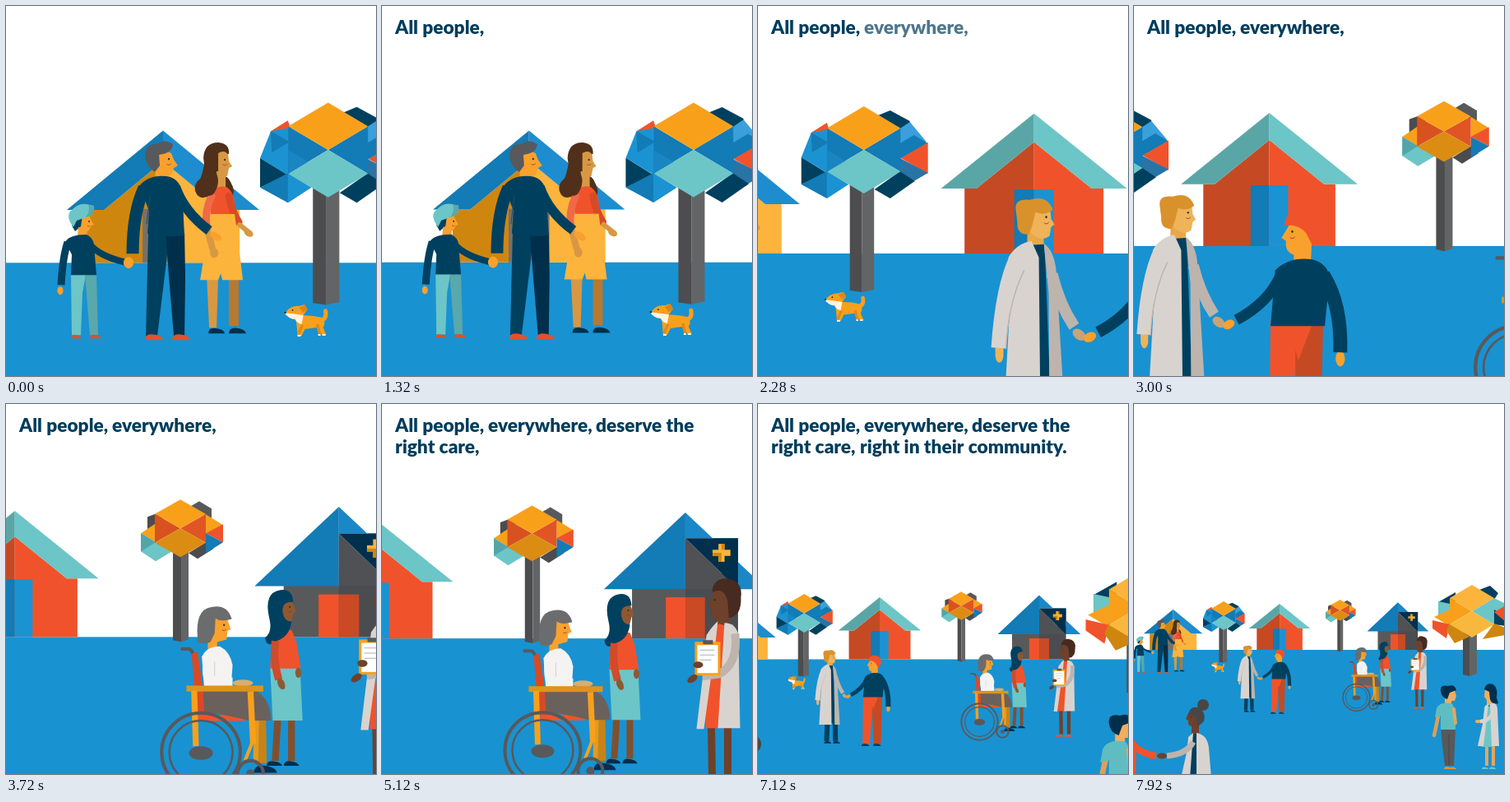
Recreate the animation shown at these times as an HTML page with a canvas. Size 450 by 450 pixels, loop 8 s.

```html
<!DOCTYPE html>
<html lang="en">
<head>
<meta charset="utf-8">
<title>Community care</title>
<style>
html, body { margin: 0; width: 100%; height: 100%; overflow: hidden; background: #fff; }
canvas { display: block; width: 100vw; height: 100vh; }
</style>
</head>
<body>
<canvas id="stage"></canvas>
<script>
const SIZE = 450, LOOP = 8000;
const canvas = document.getElementById('stage');
const ctx = canvas.getContext('2d');
const dpr = window.devicePixelRatio || 1;
canvas.width = canvas.height = SIZE * dpr;

const NAVY = '#00405f', DEEP = '#002f4c', TEAL = '#6cc5c7', RED = '#f0532b', RUST = '#c54a24',
  GOLD = '#f9a01b', SUN = '#fdb43c', OCHRE = '#cf860f', BLUE = '#137bb5', SKY = '#1b93d2',
  GREY = '#58595b', COAT = '#d9d3cf', SHADE = '#bdb4ad', SKIN = '#f9a12e', BROWN = '#6d412b',
  HAIR = '#50301a', TAN = '#d89843';

// Camera stops: centre x, horizon offset, zoom.
const CAMERA = [[58, 26.7, 3.27], [140.6, 25, 3.04], [268, 20.9, 2.705], [248, 47.6, 1.868], [225, 74, 1]];
const mix = (a, b, u) => a + (b - a) * u;
const clamp = v => Math.max(0, Math.min(1, v));

// Position along the camera stops at time t.
function progress(t) {
  const span = (a, b) => clamp((t - a) / (b - a));
  const u = span(6240, 7920);
  return span(1275, 2280) + span(2280, 3880) + span(5040, 6240) + u * (1.3 - 0.3 * u);
}
function pick(stops, p) {
  const i = Math.min(stops.length - 2, Math.floor(p));
  return stops[i].map((v, n) => mix(v, stops[i + 1][n], p - i));
}

const paths = new Map();
function fill(color, d) {
  if (!paths.has(d)) paths.set(d, new Path2D(d));
  ctx.fillStyle = color;
  ctx.fill(paths.get(d));
}
function line(color, width, d, cap = 'round') {
  if (!paths.has(d)) paths.set(d, new Path2D(d));
  ctx.strokeStyle = color;
  ctx.lineWidth = width;
  ctx.lineCap = cap;
  ctx.lineJoin = 'round';
  ctx.stroke(paths.get(d));
}
function oval(color, x, y, rx, ry = rx, turn = 0) {
  ctx.fillStyle = color;
  ctx.beginPath();
  ctx.ellipse(x, y, rx, ry, turn, 0, Math.PI * 2);
  ctx.fill();
}
function ring(color, width, x, y, r) {
  ctx.strokeStyle = color;
  ctx.lineWidth = width;
  ctx.beginPath();
  ctx.arc(x, y, r, 0, Math.PI * 2);
  ctx.stroke();
}
function box(color, x, y, w, h) {
  ctx.fillStyle = color;
  ctx.fillRect(x, y, w, h);
}
function shoe(color, x, y, w) {
  fill(color, `M${x} ${y}q0 -${w * .32} ${w * .35} -${w * .32}q${w * .6} ${w * .05} ${w * .65} ${w * .32}z`);
}
function face(x, y, k) {
  oval('#3b2519', x, y, k, k * 1.2);
  line('#8a3b1a', k * .7, `M${x - k * 2} ${y + k * 6}q${k * 2.5} ${k * 2} ${k * 4.5} ${-k * .6}`);
}

let cam;
function place([x, y, k], ox, oy, draw) {
  const [cx, h, s] = cam;
  ctx.save();
  ctx.translate(225 + s * (x - cx), 225 + s * (y + h));
  ctx.scale(s * k, s * k);
  ctx.translate(-ox, -oy);
  draw();
  ctx.restore();
}

// Houses are drawn in world units around the middle of the base line.
function house(top, eave, half, wall, roof, front, door, doorHalf, doorTop) {
  const inner = top + 11.4, foot = half * (eave - inner) / (eave - top);
  fill(front[0], `M0 ${inner}L${-foot} ${eave}H${-wall}V0H0z`);
  fill(front[1], `M0 ${inner}L${foot} ${eave}H${wall}V0H0z`);
  box(door[0], -doorHalf, doorTop, doorHalf, -doorTop);
  box(door[1], 0, doorTop, doorHalf, -doorTop);
  fill(roof[0], `M0 ${top}L${-half} ${eave}H${-foot}L0 ${inner}z`);
  fill(roof[1], `M0 ${top}L${half} ${eave}H${foot}L0 ${inner}z`);
}
function clinic() {
  box(GREY, -24.5, -23, 24.6, 23);
  box('#4b4c4f', 0, -30, 24.2, 30);
  fill(BLUE, 'M0 -57.8L-37.4 -22.6H0z');
  fill('#1b87c6', 'M0 -57.8L37.4 -22.6H24.2V-46H0z');
  fill('#505154', 'M0 -46L24.2 -22.6H0z');
  fill('#00304d', 'M0 -46H24.2V-22.6z');
  box(RED, -9, -18.9, 9, 18.9);
  box('#c94a25', 0, -18.9, 9, 18.9);
  box(SUN, 15.2, -43.4, 2.8, 8.2);
  box(SUN, 12.5, -40.7, 8.2, 2.8);
  fill(OCHRE, 'M16.6 -43.4H18V-40.7H16.6zM12.5 -39.3H16.6V-35.2H15.2V-37.9H12.5z');
}

// Front block of a tree: diamonds above and below, a triangle on each side.
function block(x, y, w, h, top, left, right, base) {
  fill(left, `M${x - w} ${y - h}L${x} ${y}L${x - w} ${y + h}z`);
  fill(right, `M${x + w} ${y - h}L${x} ${y}L${x + w} ${y + h}z`);
  fill(top, `M${x} ${y - 2 * h}l${w} ${h}l${-w} ${h}l${-w} ${-h}z`);
  fill(base, `M${x} ${y}l${w} ${h}l${-w} ${h}l${-w} ${-h}z`);
}
function trunk(l, m, r, top, bottom) {
  fill('#4d4d4f', `M${l} ${top}H${m}V${bottom}L${l} ${bottom - 2}z`);
  fill('#636466', `M${m} ${top}H${r}V${bottom - 3}L${m} ${bottom}z`);
}
function blueTree() {
  trunk(112, 126.5, 141.5, 215, 348);
  fill(NAVY, 'M144 134L161 127L185 140V157L174 150z');
  fill('#3a9fdb', 'M173 149L185 141L205 165L173 180z');
  fill(RED, 'M65 154L84 142L88 153L84 156z');
  fill(SKY, 'M65 154L86 150V204L53 184z');
  fill(BLUE, 'M65 154L86 166L66 178z');
  fill(NAVY, 'M53 184L84 203L53 217z');
  fill(BLUE, 'M53 217L84 201L110 217L84 234z');
  fill(SKY, 'M84 201L110 217L84 234z');
  fill(BLUE, 'M173 167L190 157L207 167L173 186z');
  fill(RED, 'M207 166V204L174 185z');
  fill('#2a73a5', 'M173 185L207 203L190 213L173 204z');
  fill(NAVY, 'M173 201L191 213L161 234L142 223z');
  block(129, 175, 44.5, 26.5, GOLD, BLUE, BLUE, TEAL);
  fill('#1985c3', 'M84.5 201.5L106.7 188.3L84.5 175z');
}
function goldTree() {
  trunk(202, 212, 221, 176, 289);
  fill('#4b4c4f', 'M171 137L190 130V148L171 158z');
  fill(GREY, 'M222 125L234 118L249 127V140L240 135z');
  fill('#4b4c4f', 'M221 181L242 168L251 176L232 188z');
  fill(GOLD, 'M163 157L181 145V168z');
  fill(TEAL, 'M163 157L201 179L181 191L163 179z');
  fill('#53a5aa', 'M163 157L181 168L163 179z');
  fill(GOLD, 'M242 134L263 147L242 158z');
  fill(RED, 'M263 146V168L242 157z');
  fill(BLUE, 'M242 157L263 168L242 181z');
  block(211, 151, 31, 17.5, GOLD, '#d7521f', '#e15524', '#db8d13');
}
function brightTree() {
  trunk(400, 408, 417, 275, 331);
  fill(NAVY, 'M370 241L391 229V246L370 256z');
  fill(NAVY, 'M420 226L433 221L443 230L438 238z');
  fill(TEAL, 'M370 240L398 246L384 268L370 258zM438 236L450 242V262L432 250z');
  fill(GOLD, 'M365 259L384 250V270z');
  fill(RED, 'M363 263L384 268L380 285L363 273z');
  fill(OCHRE, 'M380 276L384 266L408 283L390 291z');
  fill(NAVY, 'M438 250L452 259V270L438 268z');
  fill(RED, 'M438 253L452 245V265z');
  fill(OCHRE, 'M438 267L451 272V281L424 286z');
  block(411, 252, 27, 16, SUN, GOLD, TEAL, '#f8b83e');
}

function family() {
  // boy
  line(NAVY, 9, 'M75 288Q69 306 67 340', 'butt');
  oval(SKIN, 66, 347, 3.5, 5);
  oval(SKIN, 95, 265, 9, 11);
  fill(NAVY, 'M82 258L93 256L91 269L84 275L80 268z');
  fill(SKIN, 'M88 270H98L99 282H87z');
  face(101, 263, .9);
  fill(SKIN, 'M103 261L107 267L102 269z');
  fill(TEAL, 'M82 270Q72 257 79 250Q88 240 98 242L107 244Q108 252 103 256L86 262z');
  fill('#59a8ac', 'M100 243L107 244Q108 252 103 256L97 258Q103 250 100 243z');
  fill(NAVY, 'M72 288Q77 279 98 279Q106 283 107 291L110 329H79L80 303z');
  line(NAVY, 8, 'M102 291Q114 305 143 312');
  oval(SKIN, 149, 313, 6, 5);
  fill(TEAL, 'M79 328H97L93 350L91 401H80z');
  fill('#59a8ac', 'M96 328H110L112 401H102z');
  shoe('#d8532b', 79, 405, 13);
  shoe('#d8532b', 102, 405, 14);
  // woman
  fill(HAIR, 'M240 186Q241 167 258 167Q272 168 271 181L262 182Q256 190 261 208Q269 206 273 215Q280 227 274 234Q266 241 261 233Q254 241 244 233Q234 237 230 226Q228 217 236 211Q243 200 240 186z');
  line('#b67932', 12, 'M277 330L277 390', 'butt');
  fill(TAN, 'M244 330H258L256 392H247z');
  shoe(DEEP, 246, 399, 20);
  shoe(DEEP, 271, 399, 21);
  fill(TAN, 'M256 202H267V226H256zM258 180Q266 175 270 182L271 190L275 196L271 198L269 208L258 207z');
  face(266, 188, 1);
  fill(RED, 'M247 228Q257 218 268 221Q276 226 278 239L277 256H249z');
  line('#d84a26', 9, 'M271 232Q274 250 283 264');
  line(TAN, 6, 'M284 267L294 275');
  oval(TAN, 295, 277, 6, 4, .5);
  fill(SUN, 'M249 254H278L288 334H263L261 326L258 334H236L244 285z');
  line('#ee6a48', 9, 'M250 232Q241 250 244 270');
  line(TAN, 8, 'M245 274L251 296');
  oval(TAN, 253, 301, 5, 6);
  fill(HAIR, 'M243 186Q259 182 257 176Q259 192 255 203Q262 216 252 230Q242 236 234 223z');
  // man
  oval(SKIN, 149, 313, 6, 7);
  fill(SKIN, 'M181 188Q190 174 201 180L204 188L209 195L204 198L201 207L194 208L193 218H182z');
  fill(GREY, 'M169 181Q171 168 184 169Q192 162 203 169Q202 180 186 182L187 195L181 203Q169 195 169 181z');
  face(198, 187, 1.1);
  fill(NAVY, 'M173 277H199L194 320L184 402H170z');
  fill(DEEP, 'M194 277H217L218 330L217 402H204L198 330z');
  fill(NAVY, 'M162 220Q173 206 195 208Q211 210 214 228L217 280Q196 283 172 278L174 250z');
  line(NAVY, 15, 'M168 222Q154 252 154 302', 'butt');
  line(NAVY, 12, 'M206 221Q217 252 247 274', 'butt');
  line('#174e6e', 1, 'M175 232L171 266');
  oval(SKIN, 255, 281, 8, 4.5, .55);
  shoe('#e0532b', 169, 407, 22);
  shoe('#e0532b', 202, 407, 22);
}

function dog() {
  line(GOLD, 5, 'M381 384Q390 382 388 372');
  fill(GOLD, 'M352 378Q368 376 384 380Q389 386 385 392L389 401H384L377 392L363 394L359 402H354z');
  line('#e18a17', 3.5, 'M360 389L355 400M378 388L381 400', 'butt');
  line('#fff3e2', 2, 'M354 402H358M384 401H388M379 401H382', 'butt');
  fill(GOLD, 'M340 373Q346 365 356 366L362 364L366 370L361 377Q355 383 346 381z');
  fill('#dd8518', 'M356 368L363 364L366 370L361 374z');
  fill('#fff3e2', 'M338 374L346 375Q354 376 361 377L359 388Q353 387 351 382Q342 381 338 374z');
  oval(DEEP, 339, 374, 1.2);
  oval(DEEP, 348, 371, .9);
}

function handshake() {
  // doctor
  line('#efb35a', 10, 'M294 408V420');
  oval('#efb35a', 294, 424, 5, 10);
  line(NAVY, 18, 'M329 490L326 564M357 490L358 564', 'butt');
  shoe(DEEP, 317, 573, 26);
  shoe(DEEP, 349, 573, 26);
  fill('#e8a849', 'M328 262H348V296H328z');
  fill('#efb35a', 'M326 252Q344 234 356 250L357 259L361 266L357 269L355 280Q345 288 332 276z');
  fill('#d9922b', 'M314 248Q312 234 331 236Q352 229 359 248Q350 256 338 251L334 267L330 278Q315 279 316 264z');
  face(351, 257, 1.2);
  fill(NAVY, 'M331 291L349 290L357 500H338z');
  fill(COAT, 'M305 306Q315 289 333 286L342 306L344 505H299L306 380z');
  fill(SHADE, 'M348 289Q360 297 363 321L374 505H355L354 350z');
  line(SHADE, 14, 'M358 326Q367 363 385 390', 'butt');
  line(COAT, 18, 'M315 307Q298 342 293 416', 'butt');
  line(SHADE, 1.5, 'M324 322Q305 360 302 417');
  oval('#c9a376', 391, 400, 9, 6, .65);
  // neighbour
  ctx.translate(398, 403);
  ctx.scale(2.02, 2.02);
  ctx.translate(-20, -373);
  fill(RED, 'M50 370H70L66 400L62 458H49z');
  fill(RUST, 'M66 370H84L82 458H69L66 400z');
  fill(RED, 'M60 370H78L68 396z');
  shoe(NAVY, 47, 462, 14);
  shoe(NAVY, 68, 462, 14);
  oval(SKIN, 95, 395, 3, 5);
  line(NAVY, 9, 'M84 341Q96 360 95 391', 'butt');
  fill(SKIN, 'M62 309Q70 303 77 310L76 333H65V328Q59 326 60 319L57 317z');
  fill(RED, 'M59 309Q60 298 72 299Q84 301 82 314L77 322L73 314Q68 308 59 309z');
  face(64, 313, .65);
  fill(NAVY, 'M53 338Q62 329 77 331Q88 334 88 344L85 374H50z');
  line(NAVY, 7, 'M57 340Q49 359 28 370', 'butt');
  oval(SKIN, 23, 373, 4, 2.8, -.5);
}

function clinicVisit() {
  // visitor
  line('#80502e', 8, 'M285 380L282 431M301 380L301 431', 'butt');
  shoe(DEEP, 272, 437, 18);
  shoe(DEEP, 292, 437, 18);
  fill(TEAL, 'M276 322H311L314 384H279z');
  fill('#8d5931', 'M286 244Q300 237 303 248L306 256L303 259L300 271H286z');
  fill(RED, 'M278 286Q288 275 301 278Q308 291 309 323H276z');
  line(RED, 7, 'M303 291L308 320');
  oval('#8d5931', 309, 328, 3.5, 6);
  fill(NAVY, 'M275 264Q268 234 288 231Q302 229 303 245Q288 244 291 259Q293 268 301 268Q299 286 283 291Q272 300 270 287Q279 280 275 264z');
  face(299, 251, .9);
  line('#cf4b2b', 9, 'M282 291Q279 312 286 336', 'butt');
  oval('#8d5931', 289, 341, 4, 7, -.4);
  // doctor
  line(BROWN, 9, 'M400 390L401 452M420 390L420 452', 'butt');
  shoe(RED, 387, 459, 18);
  shoe(RED, 410, 459, 18);
  fill('#472a20', 'M401 226Q404 211 419 212Q439 215 436 235Q437 258 421 260L410 246z');
  fill(BROWN, 'M403 228Q416 223 420 240L422 270H405V262Q398 260 400 250L396 246z');
  face(404, 238, 1);
  fill(RED, 'M394 284L409 267L420 270L413 394H393z');
  fill(COAT, 'M394 281Q401 270 408 264L404 300L391 395H382L391 320z');
  fill(COAT, 'M416 266Q430 266 433 281L435 394H408z');
  line(SHADE, 10, 'M429 279Q433 315 410 328L389 331', 'butt');
  box(GOLD, 380, 289, 31, 41);
  box('#fff', 383, 293, 25, 34);
  box(GREY, 390, 287, 12, 5);
  line('#a9b2b8', 1, 'M386 299H404M386 305H404M386 311H400', 'butt');
  oval(BROWN, 384, 317, 6, 4);
  oval(BROWN, 377, 334, 7, 4, -.6);
  // chair and seated woman
  line(GREY, 4, 'M173 300H181Q187 302 188 318');
  fill('#d84a26', 'M184 306L191 303L202 379H190z');
  line('#c88318', 14, 'M264 376L265 434', 'butt');
  line('#e09a25', 6, 'M260 384L259 434', 'butt');
  line(RED, 7, 'M192 381H246', 'butt');
  shoe(DEEP, 257, 445, 27);
  fill(SKIN, 'M207 264Q220 256 226 266L230 277L226 279L225 289L214 292V302H203V285z');
  fill('#6b6c6e', 'M191 287Q188 254 207 251Q226 247 231 265Q218 269 212 264L211 282L206 292Q198 296 191 292z');
  face(222, 272, 1);
  fill('#f5f3f2', 'M196 309Q202 297 217 297Q229 303 232 319L230 348H199z');
  fill('#6b615c', 'M197 344Q225 348 257 347Q277 358 277 384H251Q225 377 199 374z');
  line('#f5f3f2', 13, 'M204 312Q201 337 209 340L232 340', 'butt');
  line('#d2cfcd', 1, 'M211 315L211 331');
  oval('#d9ad70', 244, 340, 12, 4);
  box('#dc941c', 178, 343, 90, 7);
  line(GOLD, 7, 'M187 349L189 414M253 350L256 411', 'butt');
  line(GOLD, 4, 'M256 407L247 430');
  ring(GREY, 4, 195, 421, 46);
  ring(GREY, 2.5, 195, 421, 37);
  oval(GREY, 195, 422, 14, 8);
  ring(GREY, 4, 253, 446, 15);
  oval(GREY, 253, 446, 5);
}

function couple() {
  line('#dba05a', 4.5, 'M371 375L365 403');
  fill(GREY, 'M373 394H391L389 440H378L375 415z');
  line('#454649', 1, 'M383 402V439');
  shoe('#e79325', 377, 444, 9);
  shoe('#e79325', 384, 444, 8);
  fill('#f2ae5c', 'M378 349H390L392 355L390 361H386V368H378z');
  fill(DEEP, 'M373 349Q372 341 382 343Q390 340 392 348L384 351L381 359Q374 357 373 349z');
  fill('#5fbdc2', 'M368 370Q372 362 386 364Q392 368 391 396H373V379L366 381z');
  line('#e4a75a', 4, 'M389 371L391 388');
  line('#e4a75a', 4, 'M429 414V440M437 414V440', 'butt');
  shoe(TEAL, 423, 444, 8);
  shoe(TEAL, 432, 444, 8);
  fill('#f2ae5c', 'M427 346H436V366H429V360L426 356z');
  fill(DEEP, 'M426 347Q428 338 437 341Q443 346 441 357L443 364Q436 367 433 359L432 350z');
  fill(TEAL, 'M426 368H437L438 417H422z');
  fill(COAT, 'M427 367L431 365L428 391L425 416H418L424 389zM433 365Q441 361 442 371L444 416H435z');
  line(COAT, 4.5, 'M437 371Q436 384 422 386');
  oval('#f2ae5c', 418, 386, 3, 2);
}
function greeting() {
  fill(RED, 'M-15 405Q-2 401 3 414L2 455H-25z');
  line(RED, 8, 'M-3 412Q8 426 27 428', 'butt');
  fill(NAVY, 'M66 405L77 398L84 455H62z');
  fill(BROWN, 'M66 376H79V401H70V392Q65 391 66 385L63 383z');
  oval('#4a4645', 84, 366, 7);
  fill('#4a4645', 'M66 377Q68 367 78 369Q88 374 85 386L77 393L75 381z');
  face(69, 381, .6);
  fill(COAT, 'M76 400Q89 402 91 418L94 455H76zM66 405L72 400L68 455H57L64 424z');
  line(SHADE, 7, 'M72 411Q64 426 40 428', 'butt');
  oval(BROWN, 34, 428, 6, 3.5);
}

// Things nearer than the houses: place and size at each camera stop.
const GROUPS = [
  [blueTree, 129, 301, [[109, 0, .333], [109, 0, .329], [109, 0, .329], [109, 0, .329], [109, 0, .329]]],
  [family, 187, 405, [[46.4, 28.1, .306], [33, 28.1, .303], [2, 28, .3], [23, 28, .282], [33, 28, .271]]],
  [dog, 365, 403, [[101, 27.4, .306], [101.6, 27.3, .306], [101.8, 27.3, .306], [102, 27.2, .306], [102, 27, .31]]],
  [clinicVisit, 195, 421, [[340, 51, .385], [303, 51, .382], [255, 51.2, .379], [262.3, 54, .359], [270.5, 58, .357]]],
  [handshake, 398, 403, [[250, 34, .335], [197.5, 33.5, .329], [110, 32.5, .315], [138.3, 31.6, .265], [153, 35, .238]]],
  [couple, 408, 443, [[445, 189, 1.28], [445, 189, 1.28], [445, 189, 1.28], [445, 189, 1.28], [408, 144, 1]]],
  [greeting, 33, 428, [[-35, 170, 1.28], [-35, 170, 1.28], [-35, 170, 1.28], [-35, 170, 1.28], [33, 129, 1]]]
];

// Words, left edge, baseline, start of fade.
const WORDS = [
  ['All people,', 16, 34, 20],
  ['everywhere,', 129, 34, 2070],
  ['deserve the', 260, 34, 3800],
  ['right care,', 16, 60, 3800],
  ['right in their community.', 124, 60, 5530]
];
function captions(t) {
  ctx.font = '900 22.7px Lato, "Open Sans", sans-serif';
  ctx.fillStyle = '#003d5c';
  const out = 1 - clamp((t - 7690) / 220);
  for (const [text, x, y, start] of WORDS) {
    ctx.globalAlpha = clamp((t - start) / 300) * out;
    ctx.fillText(text, x, y);
  }
  ctx.globalAlpha = 1;
}

function render(t) {
  const p = progress(t);
  cam = pick(CAMERA, p);
  ctx.setTransform(dpr, 0, 0, dpr, 0, 0);
  box('#fff', 0, 0, SIZE, SIZE);
  const horizon = 225 + cam[2] * cam[1];
  box('#1992d1', 0, horizon, SIZE, SIZE - horizon);

  place([47.6, 0, 1], 0, 0, () => house(-49.2, -19.7, 35.8, 28.5, [BLUE, '#1d8dcf'], [OCHRE, SUN], ['#77706a', '#77706a'], 7.6, -20));
  place([177.1, 0, 1], 0, 0, () => house(-56, -26, 37.2, 27.8, ['#5aa6a7', TEAL], [RUST, RED], [BLUE, SKY], 7.9, -25.6));
  place([321, 0, 1], 0, 0, clinic);
  place([250.6, 0, 1 / 2.738], 211, 283, goldTree);
  place([408, 0, 1], 408, 299, brightTree);
  for (const [draw, ox, oy, stops] of GROUPS) place(pick(stops, p), ox, oy, draw);
  captions(t);
}

const begin = performance.now();
function tick() {
  render((performance.now() - begin) % LOOP);
  requestAnimationFrame(tick);
}
tick();
</script>
</body>
</html>
```
